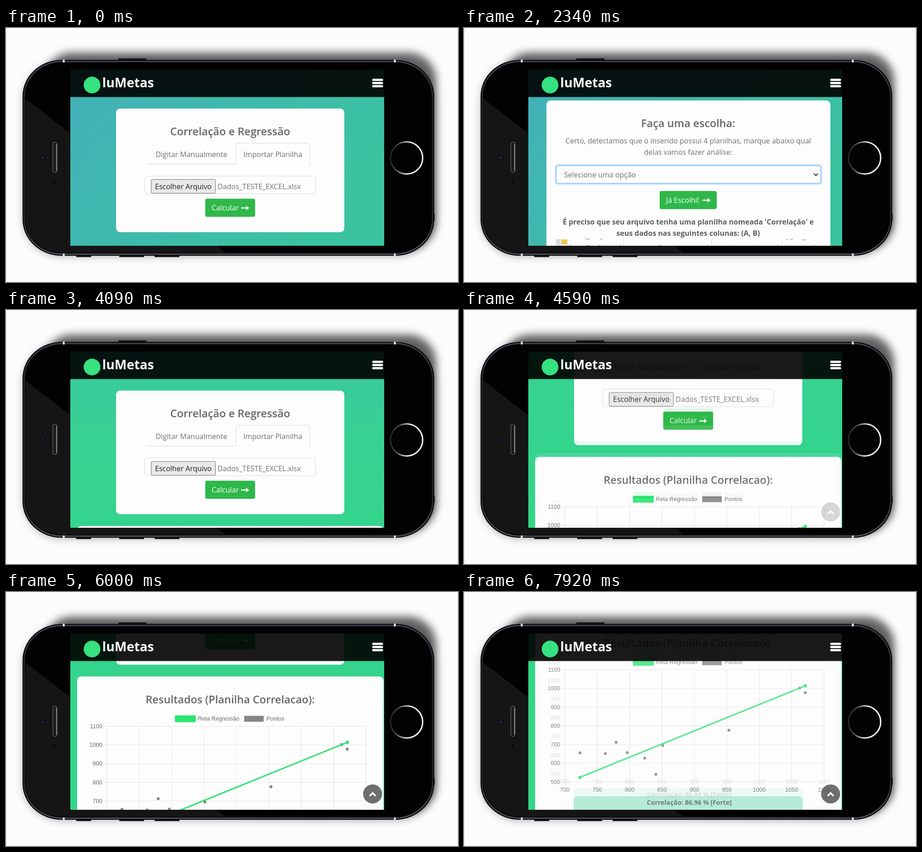
Write an HTML page that moves like this. It is 998x561 px and loops after 8 s.

```html
<!DOCTYPE html>
<html lang="pt">
<head>
<meta charset="utf-8">
<title>Correlação e Regressão</title>
<style>
html, body { margin: 0; width: 100%; height: 100%; overflow: hidden; background: #fcfcfd; }
svg { display: block; width: 100vw; height: 100vh; }
text { font: 16px "Open Sans", "Noto Sans", sans-serif; fill: #707072; }
.mid { text-anchor: middle; }
.end { text-anchor: end; }
.h { font-size: 23.6px; font-weight: 600; fill: #666668; text-anchor: middle; }
.b { font-weight: 700; fill: #5f5f61; text-anchor: middle; }
.w { fill: #fff; }
.brand { font-size: 28.3px; font-weight: 700; fill: #fff; }
.chart text { font: 12.7px "Liberation Sans", Arial, sans-serif; fill: #6a6a6a; }
.sheet text { font: 10px "Noto Sans", "Open Sans", sans-serif; fill: #666; }
.sheet .cell { font: bold 14.7px "Liberation Sans", Arial, sans-serif; fill: #1c1c1c; }
.card { fill: #fdfdfd; }
.go { fill: #2fb84a; }
.line { fill: none; stroke: #d6dade; }
.mark { fill: none; stroke-linecap: round; vector-effect: non-scaling-stroke; }

.page1, .page2, .page3, .idle, .focus, .chosen { animation: 8s step-end infinite; }
.page1 { animation-name: first; }
.page2 { animation-name: second; }
.page3 { animation-name: third; }
.idle { animation-name: idle; }
.focus { animation-name: focus; }
.chosen { animation-name: chosen; }
.scroll2 { animation: scroll2 8s infinite; }
.scroll3 { animation: scroll3 8s infinite; }
.rise { transform-origin: 0 834.5px; animation: rise 8s infinite; }
.ghost { animation: ghost 8s linear infinite; }
.top { animation: top 8s linear infinite; }

@keyframes first { 0% { opacity: 1 } 8%, 100% { opacity: 0 } }
@keyframes second { 0% { opacity: 0 } 8% { opacity: 1 } 49%, 100% { opacity: 0 } }
@keyframes third { 0% { opacity: 0 } 49%, 100% { opacity: 1 } }
@keyframes idle { 0% { opacity: 1 } 31.25%, 100% { opacity: 0 } }
@keyframes focus { 0% { opacity: 0 } 25%, 100% { opacity: 1 } }
@keyframes chosen { 0% { opacity: 0 } 31.25%, 100% { opacity: 1 } }
@keyframes scroll2 {
  0%, 34.4% { transform: translateY(0); animation-timing-function: ease-in-out }
  40.6%, 100% { transform: translateY(-89px) }
}
@keyframes scroll3 {
  0%, 52.5% { transform: translateY(0); animation-timing-function: ease-in }
  57.375% { transform: translateY(-152px); animation-timing-function: ease-out }
  61%, 71% { transform: translateY(-220px); animation-timing-function: ease-in-out }
  79%, 95.5% { transform: translateY(-360px); animation-timing-function: ease-in }
  99% { transform: translateY(-415px); animation-timing-function: linear }
  100% { transform: translateY(-433px) }
}
@keyframes rise {
  0%, 49.5% { transform: scaleY(0); animation-timing-function: cubic-bezier(.165, .84, .44, 1) }
  62%, 100% { transform: scaleY(1) }
}
@keyframes ghost {
  0%, 55% { opacity: 0; transform: translateY(-9px) }
  56%, 58.5% { opacity: .1; transform: translateY(-9px) }
  60% { opacity: 0; transform: translateY(-9px) }
  95.5% { opacity: 0; transform: translateY(-18px) }
  97.5%, 100% { opacity: .2; transform: translateY(-18px) }
}
@keyframes top { 0%, 56% { opacity: 0 } 57.375% { opacity: .27 } 60%, 100% { opacity: 1 } }
</style>
</head>
<body>
<svg viewBox="0 0 998 561" preserveAspectRatio="none">
  <defs>
    <clipPath id="screen"><path d="M142 92H835V481H142z"/></clipPath>
    <clipPath id="body"><rect x="43" y="77" width="896" height="419" rx="80" ry="74"/></clipPath>
    <filter id="soft" x="-10%" y="-20%" width="120%" height="140%"><feGaussianBlur stdDeviation="9"/></filter>
    <linearGradient id="teal" x1="0" y1="0" x2="1" y2=".5">
      <stop stop-color="#42b0b8"/><stop offset="1" stop-color="#3bc3a0"/>
    </linearGradient>
    <linearGradient id="green" x1="0" y1="0" x2="0" y2="1">
      <stop stop-color="#3ac6a2"/><stop offset=".22" stop-color="#37d292"/><stop offset=".5" stop-color="#32d688"/>
    </linearGradient>
    <linearGradient id="ring" x1="0" y1=".4" x2="1" y2=".5">
      <stop stop-color="#222"/><stop offset=".25" stop-color="#555"/><stop offset=".55" stop-color="#e8e8e8"/><stop offset="1" stop-color="#fff"/>
    </linearGradient>
    <linearGradient id="rim" x1="0" y1="0" x2="0" y2="1">
      <stop stop-color="#4b4659"/><stop offset=".2" stop-color="#2a2a2e"/><stop offset=".8" stop-color="#2a2a2e"/><stop offset="1" stop-color="#5a5864"/>
    </linearGradient>
    <path id="arrow" d="M0 -1.300H11V-5L18 0L11 5V1.300H0z" fill="#fff"/>
    <g id="form">
      <rect class="card" x="243" y="178" width="504" height="273" rx="9"/>
      <text class="h" x="495" y="237">Correlação e Regressão</text>
      <path class="line" d="M311 300.500H507.500V259q0-4.500 4.500-4.500H666q4.500 0 4.500 4.500V300.500H678"/>
      <text class="mid" x="409.500" y="284.500">Digitar Manualmente</text>
      <text class="mid" x="589" y="284.500">Importar Planilha</text>
      <rect class="line" x="306.500" y="327" width="377" height="39" rx="4"/>
      <rect x="320.500" y="334.500" width="142" height="30.500" rx="2" fill="#e9e9ea" stroke="#6f6f6f"/>
      <text class="mid" x="391.500" y="355.500" style="fill:#222">Escolher Arquivo</text>
      <text x="467" y="355.500">Dados_TESTE_EXCEL.xlsx</text>
      <rect class="go" x="440" y="377" width="110" height="40" rx="4"/>
      <text class="w" x="454" y="402.500">Calcular</text>
      <use href="#arrow" x="519" y="397.500"/>
    </g>
  </defs>

  <rect width="998" height="561" fill="#fcfcfd"/>
  <path d="M.5 0V561M997.500 0V561" stroke="#dcdbd0"/>

  <!-- phone -->
  <g filter="url(#soft)">
    <rect x="38" y="76" width="909" height="428" rx="84" opacity=".32"/>
    <rect x="84" y="54" width="866" height="434" rx="62" opacity=".6"/>
  </g>
  <path d="M248 67H310V74H248zM155 498H188V506H155zM250 498H305V506H250zM328 498H383V506H328zM940 410H946.500V426H940z" fill="#17171a"/>
  <rect x="36.500" y="70.500" width="909" height="432.500" rx="86" ry="80" fill="#08080a"/>
  <rect x="40" y="74" width="902" height="425.500" rx="83" ry="77" fill="none" stroke="url(#rim)" stroke-width="2.500"/>
  <g clip-path="url(#body)">
    <rect x="43" y="77" width="896" height="419" fill="#020203"/>
    <path d="M43 156L484 496H43z" fill="#151516"/>
  </g>
  <path d="M127.500 70V76M858.500 70V76M127.500 498V503M858.500 498V503" stroke="#eee" stroke-width="4"/>
  <rect x="103.500" y="252" width="9" height="67" rx="4.500" fill="#18181a" stroke="#4c4c50" stroke-width="2"/>
  <path d="M111.500 256V315" stroke="#8a8a8c" stroke-width="2"/>
  <circle cx="81" cy="287" r="5" fill="#0a0c14"/>
  <circle cx="81" cy="287" r="2.500" fill="#1d3560"/>
  <circle cx="107" cy="340" r="2.500" fill="#050505"/>
  <circle cx="884.500" cy="287" r="35.500" fill="#020203" stroke="url(#ring)" stroke-width="3"/>

  <!-- screen -->
  <g clip-path="url(#screen)">
    <g class="page1">
      <rect x="142" y="92" width="694" height="390" fill="url(#teal)"/>
      <use href="#form"/>
    </g>

    <g class="page2">
      <rect x="142" y="92" width="694" height="390" fill="url(#teal)"/>
      <g class="scroll2">
        <rect class="card" x="182" y="160" width="627" height="600" rx="9"/>
        <text class="h" x="495" y="219">Faça uma escolha:</text>
        <text class="mid" x="495" y="255">Certo, detectamos que o inserido possui 4 planilhas, marque abaixo qual</text>
        <text class="mid" x="495" y="280">delas vamos fazer análise:</text>
        <rect class="line" x="203.500" y="304" width="584" height="39" rx="4"/>
        <g class="focus" fill="none">
          <rect x="202.500" y="303" width="586" height="41" rx="5" stroke="#bfdeff" stroke-width="4"/>
          <rect x="203.500" y="304" width="584" height="39" rx="4" stroke="#80bdff"/>
        </g>
        <text class="idle" x="221" y="330">Selecione uma opção</text>
        <text class="chosen" x="221" y="330">Correlacao</text>
        <path d="M772.500 321.500L777 326L781.500 321.500" fill="none" stroke="#333" stroke-width="2.200"/>
        <rect class="go" x="432" y="360" width="126" height="40" rx="4"/>
        <text class="w" x="446" y="386">Já Escolhi!</text>
        <use href="#arrow" x="526.500" y="380.500"/>
        <text class="b" x="495" y="434">É preciso que seu arquivo tenha uma planilha nomeada 'Correlação' e</text>
        <text class="b" x="495" y="459">seus dados nas seguintes colunas: (A, B)</text>

        <g class="sheet" transform="translate(0 89)">
          <path d="M203 377H230V482H203z" fill="#f1f1f3"/>
          <path d="M215 378H228V389H215z" fill="#f2c84b"/>
          <path d="M203 377H213V390H203z" fill="#dcd8e4"/>
          <path d="M216 398H222L226 402V411H216z" fill="#4b9fe0"/>
          <path d="M207 420H212L214 422H220V431H207zM207 440H212L214 442H220V451H207z" fill="#a9adb0"/>
          <path d="M204 462H213M204 466H211M204 470H213" stroke="#999"/>
          <text x="219" y="470">@</text>
          <path d="M352.500 377V403M546.500 377V403M702.500 377V403M230 406.500H788M233 464.500H788" class="line"/>
          <text x="232" y="398.500">Área de Transferência</text>
          <text class="mid" x="442" y="398.500">Fonte</text>
          <text class="mid" x="616" y="398.500">Alinhamento</text>
          <text class="mid" x="735" y="398.500">Número</text>
          <path id="launch" d="M343 398V392H348M345 394L349 398M349 395V398H346" fill="none" stroke="#888"/>
          <use href="#launch" x="193"/><use href="#launch" x="348"/><use href="#launch" x="429"/>
          <path d="M268 377H278M300 377H306M712 378l4-1M720 378l6-1M746 379h8" stroke="#777"/>
          <path class="line" d="M234.500 413.500H328.500V437H234.500zM358 413.500H460V437H358zM789 413.500H464V437H789"/>
          <text x="241" y="429.500" style="font-size:11.500px">D9</text>
          <path d="M316 423H324L320 427.500z" fill="#777"/>
          <path d="M344 420V431" stroke="#999" stroke-width="1.500" stroke-dasharray="1.500 3"/>
          <path d="M372 421L380 429M380 421L372 429M404 425L408 429L415 420" fill="none" stroke="#bbb" stroke-width="1.500"/>
          <text x="438" y="429" style="font:italic bold 12px 'Liberation Serif',serif">fx</text>
          <path d="M622 446H680V464H622z" fill="#dadada"/>
          <path d="M622 464H680" stroke="#217346" stroke-width="2"/>
          <path class="line" d="M253.500 447V482M387.500 465V482M564.500 447V482M622.500 447V482M680.500 447V482M738.500 447V482"/>
          <g id="columns"></g>
          <text class="mid" x="241" y="479">1</text>
          <text class="cell" x="257" y="479">Rent ($) [eixo X]</text>
          <text class="cell" x="390.500" y="479">Mortgage ($) [eixo Y]</text>
          <g stroke="#3f97e6" fill="#3f97e6" stroke-width="2.500">
            <path d="M349 405L350 450M583 418L548 452"/>
            <path d="M346.500 449H353.500L350 457zM545 448.500L551 454L542.500 457z" stroke-width="1"/>
          </g>
        </g>
      </g>
    </g>

    <g class="page3">
      <g class="scroll3">
        <g id="results">
          <rect x="142" y="60" width="694" height="1100" fill="url(#green)"/>
          <use href="#form"/>
          <rect class="card" x="157" y="477" width="676.500" height="640" rx="9"/>
          <text class="h" x="495" y="536.500">Resultados (Planilha Correlacao):</text>
          <g class="chart">
            <path d="M373 563H419V578H373z" fill="#2be570"/>
            <path d="M526 564H569V577H526z" fill="#858587"/>
            <text x="423.500" y="574">Reta Regressão</text>
            <text x="575" y="574">Pontos</text>
            <g id="plot"></g>
            <g class="rise">
              <path id="dots" class="mark" stroke="#808082" stroke-width="6.400"/>
              <path class="mark" d="M256 824.500L753.500 622.500" stroke="#2be070" stroke-width="3"/>
              <path class="mark" d="M256 824.500h0M753.500 622.500h0" stroke="#2be070" stroke-width="7.400"/>
            </g>
          </g>
          <rect x="242" y="866" width="506" height="60" rx="9" fill="#b6ecd8"/>
          <text class="b" x="497.500" y="885" style="font-size:14.200px">Correlação: 86.96 % [Forte]</text>
        </g>
        <use class="ghost" href="#results"/>
      </g>
      <g class="top">
        <circle cx="809.500" cy="446" r="21" fill="#555" opacity=".85"/>
        <path d="M803 450.500L809.500 444L816 450.500" fill="none" stroke="#fff" stroke-width="3.500"/>
      </g>
    </g>

    <!-- navigation bar -->
    <rect x="142" y="92" width="694" height="60.500" opacity=".9"/>
    <circle cx="190" cy="126" r="18.500" fill="#35e27f"/>
    <text class="brand" x="212.500" y="131">luMetas</text>
    <path d="M811 114.500H830M811 121.500H830M811 128.500H830" stroke="#fff" stroke-width="5" stroke-linecap="round"/>
  </g>
</svg>
<script>
const byId = id => document.getElementById(id);
const label = (x, y, s, cls) => `<text class="${cls}" x="${x}" y="${y}">${s}</text>`;
const grid = d => `<path d="${d}" stroke="#e2e2e4"/>`;

const columns = [320, 476, 593, 651, 709, 767];
byId('columns').innerHTML = columns.map((x, i) => {
  const name = 'ABCDEF'[i];
  const body = name === 'D' ? '<tspan fill="#217346" font-weight="700">D</tspan>' : name;
  return label(x, 458.5, body, 'mid');
}).join('');

const left = 222.5, right = 795, upper = 587, lower = 834.5;
const plot = [];
for (let v = 500; v <= 1100; v += 100) {
  const y = lower - (v - 500) * (lower - upper) / 600;
  plot.push(grid(`M${left - 9} ${y}H${right}`), label(212.5, y + 4.3, v, 'end'));
}
for (let v = 700; v <= 1100; v += 50) {
  const x = left + (v - 700) * (right - left) / 400;
  plot.push(grid(`M${x} ${upper}V${lower + 9}`), label(x, 856, v, 'mid'));
}
byId('plot').innerHTML = plot.join('');

const points = [[256, 770.5], [312, 772], [336, 747], [360.5, 770], [399, 782],
  [423.5, 818], [439, 754], [585, 720.5], [741, 627.5], [753.5, 637.5]];
byId('dots').setAttribute('d', points.map(([x, y]) => `M${x} ${y}h0`).join(''));
</script>
</body>
</html>
```
